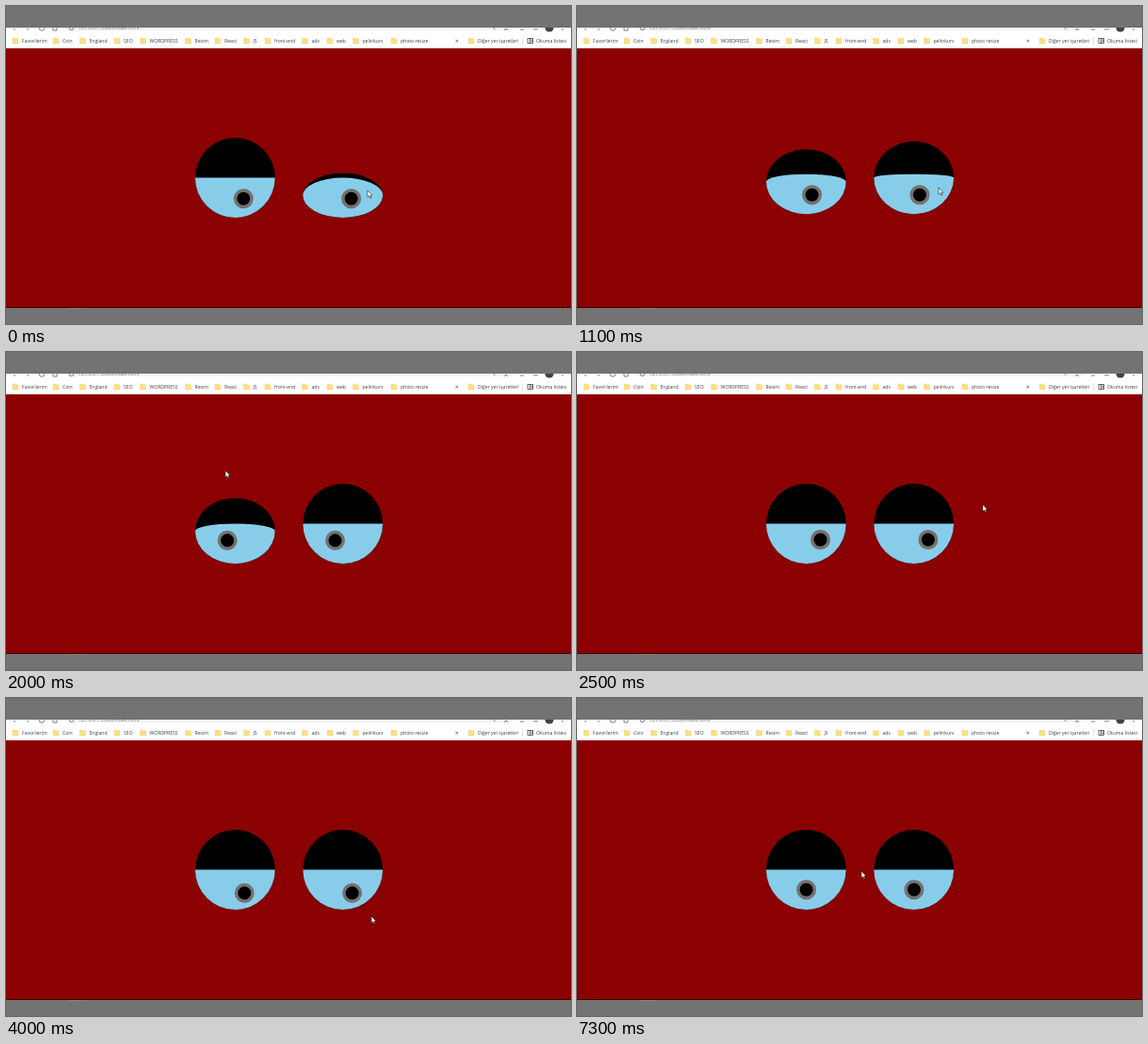
An HTML page for the animation above (7500 ms loop, 600 px wide and 338 px high).

```html
<!DOCTYPE html>
<html lang="tr">
<head>
<meta charset="utf-8">
<title>Eyes</title>
<style>
  html, body { margin: 0; width: 100%; height: 100%; overflow: hidden; background: #8b0000; }
  svg { display: block; width: 600px; height: 338px; }
  text { font: 5.1px "Open Sans", "Noto Sans", sans-serif; fill: #3c4043; }
  .url { font-size: 5.3px; fill: #777; }
  .more { font-size: 7px; }
  .sky { fill: #87cdea; }
  .bar { fill: #737373; }
  .icon { fill: none; stroke: #5f6368; stroke-width: .8; }
</style>
</head>
<body>
<svg viewBox="0 0 600 338">
  <rect width="600" height="338" fill="#8b0000"/>
  <rect y="23" width="600" height="22" fill="#fff"/>
  <rect x="62" y="15" width="478" height="11" rx="5" fill="#f1f3f4"/>
  <text class="url" x="77" y="25.2">127.0.0.1:5500/index.html</text>
  <g class="icon">
    <path d="M8 24l2 1.5M22 25.5l2-1.5"/>
    <circle cx="38" cy="23.4" r="2.8"/>
    <path d="M50 22v4h4V22"/>
    <circle cx="69.5" cy="23.4" r="2.2"/>
    <path d="M517 22.4l2.5 2.8M529 25.6l2-1.5 2 1.5M546 25h4M560 24.8h5"/>
    <path d="M591 24v1.6" stroke-width="1.1"/>
  </g>
  <circle cx="577" cy="23" r="4.6" fill="#3c434b"/>
  <g id="marks"></g>
  <path d="M548.5 33v8" stroke="#ccc" stroke-width=".6"/>
  <g fill="none" stroke="#444" stroke-width=".8">
    <rect x="554" y="34.4" width="5.6" height="5"/>
    <path d="M556.4 34.4v5M557.4 36h2M557.4 37.6h2"/>
  </g>
  <g id="eyes"></g>
  <path id="cursor" d="M0 0V7.2L1.7 5.7 2.9 8.3 4 7.8 2.9 5.3H5Z" fill="#fff" stroke="#000" stroke-width=".5"/>
  <rect class="bar" width="600" height="23"/>
  <rect class="bar" y="321" width="600" height="17"/>
  <rect y="320" width="600" height="1" fill="#400404"/>
  <rect x="65" y="321" width="20" height="1" fill="#828282"/>
</svg>
<script>
const LOOP = 7500, FRAME = 100, LAG = 40;
const R = 42.4, MID = 182.5, BALL = 10.5;
const BLINK = 450;        // ms for a lid to open or close fully
const TICK = 10;          // step of the lid simulation
const CENTRES = [243.3, 357.7];
const NS = "http://www.w3.org/2000/svg";

const set = (el, attrs) => { for (const k in attrs) el.setAttribute(k, attrs[k]); };
const add = (parent, tag, attrs, text = "") => {
  const el = document.createElementNS(NS, tag);
  set(el, attrs);
  el.textContent = text;
  parent.append(el);
  return el;
};
const clamp = (v, lo, hi) => Math.min(hi, Math.max(lo, v));

// Bookmarks bar
const marks = document.getElementById("marks");
const folders = {
  Favorilerim: 17, Coin: 60, England: 88.5, SEO: 125, WORDPRESS: 152.5, Resim: 200.5,
  React: 232, JS: 262.5, "front-end": 285, ads: 324.5, web: 351, pelinkurs: 378.5,
  "photo resize": 419, "Diğer yer işaretleri": 501
};
const label = (x, text, cls = "") => add(marks, "text", { x, y: 38.7, class: cls }, text);
for (const name in folders) {
  const x = folders[name];
  add(marks, "path", { d: `M${x - 10} 34h2.4l.8.8h2.8v5.2h-6z`, fill: "#fadf85", stroke: "#efcf6c", "stroke-width": .4 });
  label(x, name);
}
label(477, "»", "more");
label(563, "Okuma listesi");

// Turning points of the pointer: time, x, y; a repeated place is a rest
const path = [
  [0, 384, 196], [400, 575, 60], [500, 330, 27], [580, 170, 110], [650, 206, 190],
  [900, 270, 197], [1000, 306, 194], [1100, 384, 193], [1300, 372, 192], [1600, 250, 197],
  [1800, 215, 182], [2000, 233, 126], [2200, 340, 39], [2400, 451, 90], [2680, 330, 282],
  [2900, 102, 190], [3100, 197, 72], [3400, 400, 24], [3600, 576, 110], [4000, 388, 232],
  [5000, 388, 232], [5400, 378, 263], [5700, 331, 260], [6100, 331, 260], [6500, 204, 255],
  [6700, 268, 240], [6900, 303, 194], [7300, 302, 184]
];

// Velocity through point i, zero where the pointer rests
function velocity(i, axis) {
  const a = path[i - 1], p = path[i], b = path[i + 1];
  const same = q => q[1] === p[1] && q[2] === p[2];
  if (!a || !b || same(a) || same(b)) return 0;
  return (b[axis] - a[axis]) / (b[0] - a[0]);
}

function pointer(t) {
  t = clamp(t, 0, LOOP);
  const next = path.findIndex(p => p[0] > t);
  if (next < 0) return path[path.length - 1].slice(1);
  const i = next - 1, a = path[i], b = path[next];
  const span = b[0] - a[0], u = (t - a[0]) / span, v = 1 - u;
  return [1, 2].map(n =>
    a[n] * (1 + 2 * u) * v * v + b[n] * u * u * (3 - 2 * u) +
    span * u * v * (velocity(i, n) * v - velocity(next, n) * u));
}

// The pair stays centred with both eyes on one base line
const baseline = lids => MID + (R + Math.max(...lids)) / 2;

// A lid opens while the pointer is inside its eye, else it closes
function simulate() {
  let lids = [R, 5];
  const history = [];
  for (let t = 0; t < LOOP; t += TICK) {
    history.push(lids);
    const [x, y] = pointer(t), bottom = baseline(lids);
    lids = lids.map((lid, i) => {
      const ry = (R + lid) / 2;
      const inside = Math.hypot((x - CENTRES[i]) / R, (y - bottom + ry) / ry) < 1;
      return clamp(lid + (inside ? -1 : 1) * R * TICK / BLINK, 0, R);
    });
  }
  return history;
}
const history = simulate();

const eyes = CENTRES.map(cx => {
  const g = add(document.getElementById("eyes"), "g", {});
  return {
    cx,
    lid: add(g, "ellipse", { cx, rx: R }),
    white: add(g, "path", { class: "sky" }),
    ball: add(g, "circle", { r: BALL - 1.75, stroke: "#747171", "stroke-width": 3.5 })
  };
});
const cursor = document.getElementById("cursor");

function draw(time) {
  const t = Math.floor(time % LOOP / FRAME) * FRAME;
  const [x, y] = pointer(t), [px, py] = pointer(t - LAG);
  const lids = history[t / TICK], bottom = baseline(lids);
  const inset = 2 * (R - BALL) * clamp(px / 600, 0, 1);
  const drop = (R - 2 * BALL) * clamp((py - 45) / 276, 0, 1);

  set(cursor, { transform: `translate(${x} ${y})` });
  eyes.forEach(({ cx, lid, white, ball }, i) => {
    const ry = (R + lids[i]) / 2, top = (R - lids[i]) / 2, mid = bottom - ry;
    const left = cx - R, right = cx + R;
    const upper = top > .05 ? `A${R} ${top} 0 0 1 ${right} ${mid}` : `H${right}`;
    set(lid, { cy: mid, ry });
    set(white, { d: `M${left} ${mid}${upper}A${R} ${ry} 0 0 1 ${left} ${mid}Z` });
    set(ball, { cx: left + BALL + inset, cy: bottom - R + BALL + drop });
  });
}

function tick() {
  draw(performance.now());
  requestAnimationFrame(tick);
}
tick();
</script>
</body>
</html>
```
